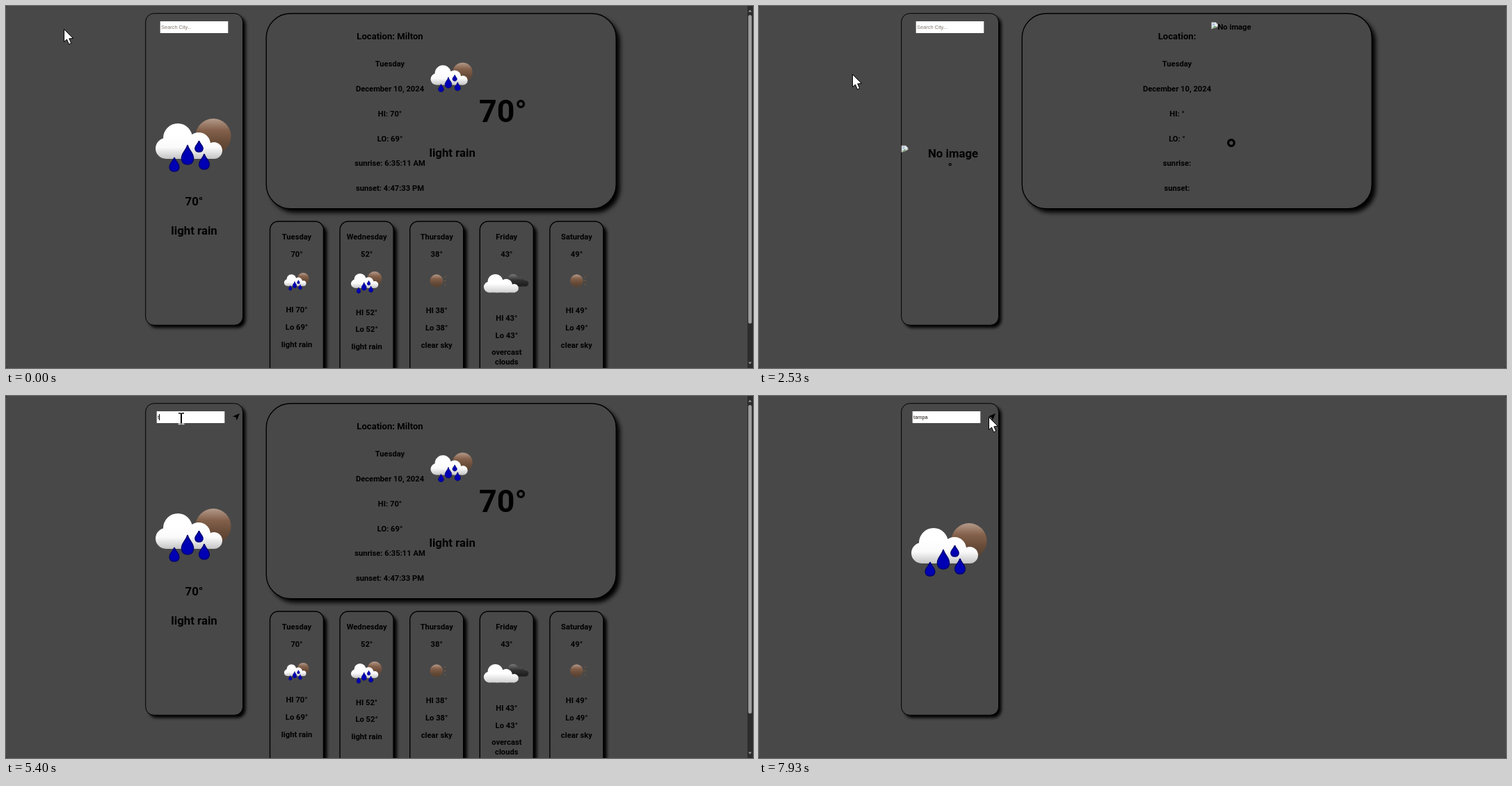
An HTML page with a canvas that plays this animation: 1074x521 px, repeating every 8000 ms.

```html
<!DOCTYPE html>
<html lang="en">
<head>
<meta charset="utf-8">
<title>Weather</title>
<style>
html, body { margin: 0; width: 100%; height: 100%; overflow: hidden; background: #484848; }
canvas { display: block; }
</style>
</head>
<body>
<canvas id="stage" width="1074" height="521"></canvas>
<script>
const W = 1074, H = 521, LOOP = 8000, BG = '#484848';
const c = document.getElementById('stage').getContext('2d');

// Pointer path: step (1/15 s), x, y
const PATH = [
  [0, 83, 33], [4, 74, 54], [7, 80, 72], [9, 80, 72], [15, 34, 3], [16, 34, -40],
  [31, 58, -40], [32, 58, 1], [38, 134, 98], [44, 173, 118], [46, 217, 112],
  [50, 253, 60], [53, 252, 32], [102, 252, 32], [108, 300, 34], [113, 330, 30], [120, 330, 30]
];
const TYPED = [81, 83, 86, 89, 91];
const CARET_ON = [[55, 63], [71, 79], [81, 99], [107, 115]];

// day, temperature, low, sky, icon, y of the high
const DAYS = [
  ['Tuesday', 70, 69, ['light rain'], () => rain(418, 396.5, 0.33), 441.3],
  ['Wednesday', 52, 52, ['light rain'], () => rain(518.5, 397.7, 0.41), 444.6],
  ['Thursday', 38, 38, ['clear sky'], () => sun(619, 395.5), 442],
  ['Friday', 43, 43, ['overcast', 'clouds'], overcast, 452.8],
  ['Saturday', 49, 49, ['clear sky'], () => sun(820.5, 395.5), 442]
];

function text(s, x, y, size = 11.2) {
  c.font = `bold ${size}px Roboto, sans-serif`;
  c.textAlign = 'center';
  c.fillStyle = '#000';
  c.fillText(s, x, y);
}

function card(x, y, w, h, r, line, offset, blur) {
  c.save();
  c.beginPath();
  c.roundRect(x, y, w, h, r);
  c.shadowColor = '#000';
  c.shadowOffsetX = c.shadowOffsetY = offset;
  c.shadowBlur = blur;
  c.fillStyle = BG;
  c.fill();
  c.restore();
  c.lineWidth = line;
  c.strokeStyle = '#000';
  c.stroke();
}

function poly(points, fill, stroke) {
  c.beginPath();
  points.forEach(p => c.lineTo(...p));
  c.closePath();
  c.fillStyle = fill;
  c.fill();
  if (stroke) {
    c.lineWidth = 1;
    c.strokeStyle = stroke;
    c.stroke();
  }
}

function shade(y0, y1, ...colors) {
  const g = c.createLinearGradient(0, y0, 0, y1);
  colors.forEach((color, i) => g.addColorStop(i / (colors.length - 1), color));
  return g;
}

function blobs(circles, fill) {
  c.beginPath();
  for (const [x, y, r] of circles) {
    c.moveTo(x + r, y);
    c.arc(x, y, r, 0, 7);
  }
  c.fillStyle = fill;
  c.fill();
}

function disc(x, y, r) {
  blobs([[x, y, r]], shade(y - r, y + r, '#b49a8a', '#83604a', '#674b38', '#56402f'));
}

function cloud(fill) {
  blobs([[-40, 5, 15], [-23, -10, 21], [-18, 4, 16], [7, -1, 17], [8, 7, 13], [29, 8, 12]], fill);
  c.fillRect(-40, 6, 70, 14);
}

function drop(x, y, w, h) {
  c.beginPath();
  c.moveTo(x, y);
  c.bezierCurveTo(x + w * 0.2, y + h * 0.3, x + w, y + h * 0.45, x + w * 0.85, y + h * 0.75);
  c.bezierCurveTo(x + w * 0.65, y + h * 1.08, x - w * 0.65, y + h * 1.08, x - w * 0.85, y + h * 0.75);
  c.bezierCurveTo(x - w, y + h * 0.45, x - w * 0.2, y + h * 0.3, x, y);
  c.fillStyle = '#0000b4';
  c.fill();
  c.lineWidth = 1.5;
  c.strokeStyle = '#000078';
  c.stroke();
}

function placed(x, y, scale, draw) {
  c.save();
  c.translate(x, y);
  c.scale(scale, scale);
  draw();
  c.restore();
}

function rain(x, y, scale) {
  placed(x, y, scale, () => {
    disc(28, -12.5, 25.5);
    cloud(shade(-30, 20, '#fff', '#fff', '#fafafa', '#c4c4c4'));
    drop(-9, 0, 10, 28);
    drop(-28, 18, 8, 20);
    drop(15, 13, 8.5, 22);
    drop(7.5, -6, 6.5, 16);
  });
}

function sun(x, y) {
  c.lineWidth = 1;
  c.strokeStyle = '#75583f';
  c.beginPath();
  for (const [a, b] of [[-4, -7], [0, 0], [4, 7]]) {
    c.moveTo(x + 10.5, y + a);
    c.lineTo(x + 14, y + b);
  }
  c.stroke();
  disc(x, y, 9.3);
}

function overcast() {
  placed(737, 396.5, 0.35, () => cloud(shade(-30, 20, '#777', '#303030', '#1c1c1c')));
  placed(715.5, 402, 0.52, () => cloud(shade(-30, 20, '#fff', '#fff', '#d0d0d0')));
}

function brokenImage(x, y) {
  poly([[x, y], [x + 6, y], [x + 9, y + 3], [x + 9, y + 6], [x, y + 9.5]], '#e4e8ee', '#999');
  blobs([[x + 3, y + 3, 1.5]], '#9db8dc');
  poly([[x + 0.5, y + 9], [x + 4, y + 5], [x + 7, y + 6]], '#69a763');
}

function search(step, dx) {
  const typed = 'tampa'.slice(0, TYPED.filter(s => step >= s).length);
  const x = (typed ? 216.7 : 221.7) + dx;
  c.fillStyle = '#fff';
  c.fillRect(x, 22, 97.6, 17);
  c.font = '7.4px "Liberation Sans", Arial, sans-serif';
  c.textAlign = 'left';
  c.fillStyle = typed ? '#1c1814' : '#82786e';
  c.fillText(typed || 'Search City...', x + 1.4, 33);
  if (CARET_ON.some(([a, b]) => step >= a && step < b)) {
    c.fillStyle = '#000';
    c.fillRect(Math.round(x + 1.4 + (typed ? c.measureText(typed).width : 0)), 26, 1, 9);
  }
  if (typed) poly([[336, 25], [331.7, 35.2], [330.6, 30.4], [325.8, 29.4]].map(([a, b]) => [a + dx, b]), '#000');
  return x;
}

function summary(x, values) {
  const [city, hi, lo, rise, set] = values;
  text(`Location: ${city}`.trim(), x, 48, 13.1);
  ['Tuesday', 'December 10, 2024', `HI: ${hi}°`, `LO: ${lo}°`, `sunrise: ${rise}`.trim(), `sunset: ${set}`.trim()]
    .forEach((s, i) => text(s, x, 86.8 + 35.9 * i));
}

function forecast() {
  DAYS.forEach(([day, temp, low, sky, icon, y], i) => {
    const x = 418 + 100.6 * i;
    card(x - 38.5, 310, 77, 260, 12, 1.4, 5, 4);
    text(day, x, 335.8);
    text(temp + '°', x, 360.5);
    icon();
    text(`HI ${temp}°`, x, y);
    text(`Lo ${low}°`, x, y + 24.8);
    sky.forEach((s, n) => text(s, x, y + 49.5 + 13.2 * n));
  });
}

function scrollbar() {
  c.fillStyle = '#2c2c2c';
  c.fillRect(1066, 0, 8, H);
  c.fillStyle = '#9f9f9f';
  c.beginPath();
  c.roundRect(1067.2, 13, 5, 444, 2.5);
  c.fill();
  poly([[1067.3, 8.5], [1069.7, 5.5], [1072.1, 8.5]], '#9f9f9f');
  poly([[1067.3, 512.5], [1069.7, 515.5], [1072.1, 512.5]], '#9f9f9f');
}

function arrow(x, y) {
  poly([[0, 0], [0, 18], [4, 14.6], [7, 21.5], [10.2, 20], [7.3, 13.4], [13, 13]]
    .map(([a, b]) => [x + a + 0.5, y + b + 0.5]), '#fff', '#000');
}

function beam(x, y) {
  c.fillStyle = '#000';
  c.fillRect(x - 1, y - 7, 2, 14);
  c.fillRect(x - 4, y - 8, 3.5, 1.5);
  c.fillRect(x + 0.5, y - 8, 3.5, 1.5);
  c.fillStyle = '#ddd';
  c.fillRect(x - 4.5, y + 7.4, 4, 1.8);
  c.fillRect(x + 0.5, y + 7.4, 4, 1.8);
}

function pointer(step, inputX) {
  const i = Math.max(1, PATH.findIndex(p => p[0] >= step));
  const [s0, x0, y0] = PATH[i - 1], [s1, x1, y1] = PATH[i];
  const f = (step - s0) / (s1 - s0);
  const x = x0 + (x1 - x0) * f, y = y0 + (y1 - y0) * f;
  const inside = x > inputX && x < inputX + 97.6 && y > 22 && y < 39;
  (inside ? beam : arrow)(x, y);
}

function draw(step) {
  const reloading = step >= 36 && step < 41;
  const searching = step >= 117;
  const dx = reloading || searching ? 4 : 0;
  c.fillStyle = '#363636';
  c.fillRect(0, 0, W, H);
  c.fillStyle = BG;
  c.beginPath();
  c.roundRect(0, 0, W, H, 4);
  c.fill();

  card(200.7 + dx, 10.7, 139.8, 448.6, 12, 1, 4, 4);
  if (!searching) card(374.2 + dx, 10.8, 503, 281, 35, 1.4, 5.5, 6);

  if (reloading) {
    brokenImage(205, 201);
    text('No image', 279, 217.5, 16.8);
    text('°', 274.7, 238, 16.8);
    summary(601, ['', '', '', '', '']);
    brokenImage(650.7, 23.5);
    text('No image', 683.5, 33.8);
    text('°', 679, 223, 44.8);
  } else if (searching) {
    rain(274, 221, 1);
  } else {
    rain(270, 200, 1);
    text('70°', 270.5, 287, 16.8);
    text('light rain', 270.5, 328.6, 16.8);
    summary(552, ['Milton', 70, 69, '6:35:11 AM', '4:47:33 PM']);
    rain(641, 102.5, 0.555);
    text('70°', 714.5, 167.3, 44.8);
    text('light rain', 641.7, 216.8, 16.8);
    forecast();
    scrollbar();
  }
  pointer(step, search(step, dx));
}

function tick(now) {
  draw(Math.floor((now % LOOP) * 0.015 + 0.1));
  requestAnimationFrame(tick);
}
requestAnimationFrame(tick);
</script>
</body>
</html>
```
